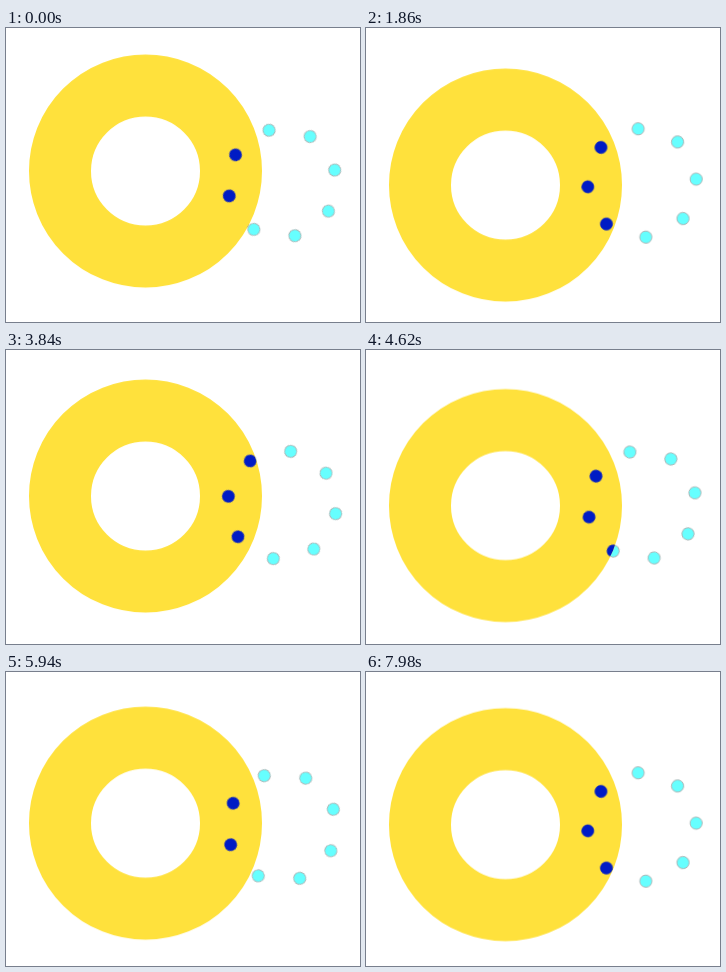
Recreate the animation shown at these times as an HTML page. Size 354x294 px, loop 8 s.

```html
<!DOCTYPE html>
<html lang="en">
<head>
<meta charset="utf-8">
<title>Ring and dots</title>
<style>
  html, body { margin: 0; width: 100%; height: 100%; overflow: hidden; background: #fff; }
  svg { display: block; width: 100%; height: 100%; }
  .bounce { animation: bounce 8s linear infinite; }
  .spin { animation: spin 8s linear infinite; }
  .outer { fill: #66ffff; stroke: #a8a8a8; stroke-width: .8; }
  .inner { fill: #001bc4; stroke: #001bc4; stroke-width: .6; }
  .ring { fill: none; stroke: #ffe13c; stroke-width: 62; }

  /* Triangle wave, 3.6 s per cycle, cut at 8 s */
  @keyframes bounce {
    0% { transform: translateY(143.05px); }
    18.75%, 63.75% { transform: translateY(161.5px); }
    41.25%, 86.25% { transform: translateY(139.4px); }
    100% { transform: translateY(152.9px); }
  }
  /* One turn takes 12.24 s */
  @keyframes spin {
    from { transform: rotate(31.2deg); }
    to { transform: rotate(266.49deg); }
  }
</style>
</head>
<body>
<svg viewBox="0 0 354 294">
  <defs>
    <g id="cross">
      <circle cx="54.3" r="6.1"/>
      <circle cx="-54.3" r="6.1"/>
      <circle cy="54.3" r="6.1"/>
      <circle cy="-54.3" r="6.1"/>
    </g>
    <g id="dots">
      <use href="#cross"/>
      <use href="#cross" transform="rotate(45)"/>
    </g>
    <clipPath id="disc">
      <circle class="bounce" cx="139.5" r="116.5"/>
    </clipPath>
  </defs>

  <g transform="translate(276 155)">
    <g class="spin outer"><use href="#dots"/></g>
  </g>
  <circle class="bounce ring" cx="139.5" r="85.5"/>
  <g clip-path="url(#disc)">
    <g transform="translate(276 155)">
      <g class="spin inner"><use href="#dots"/></g>
    </g>
  </g>
</svg>
</body>
</html>
```
